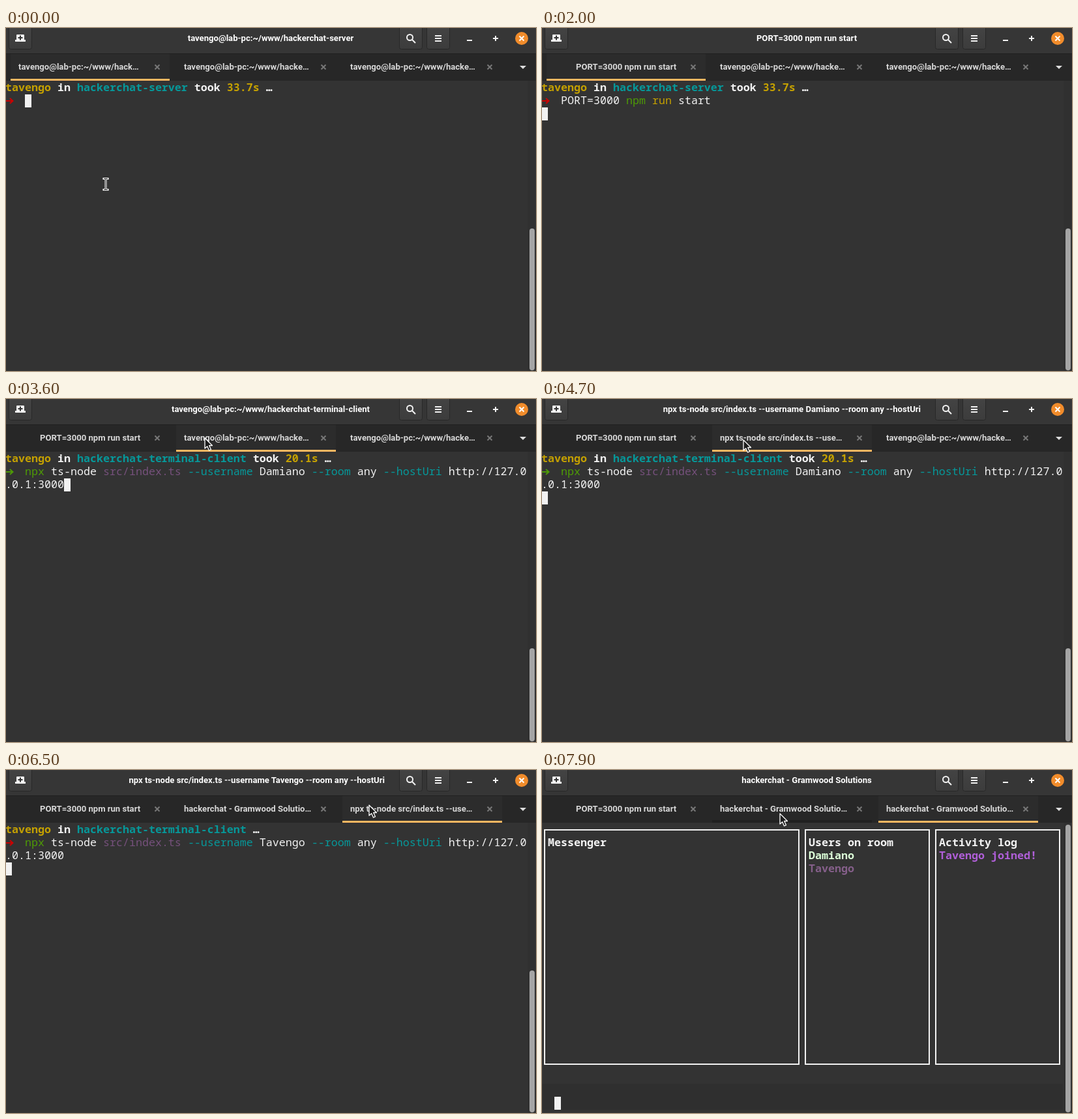
An HTML page for the animation above (8000 ms loop, 813 by 527 pixels).

```html
<!DOCTYPE html>
<html lang="en">
<head>
<meta charset="utf-8">
<title>Terminal chat</title>
<style>
html, body { margin: 0; width: 813px; height: 527px; overflow: hidden; background: #333; }
svg { display: block; }
text { white-space: pre; }
.mono { font: 400 16.667px "Noto Sans Mono", "DejaVu Sans Mono", monospace; }
.bold { font-weight: 700; }
.ui { font: 700 13.1px Roboto, "Open Sans", sans-serif; }
</style>
</head>
<body>
<svg width="813" height="527" viewBox="0 0 813 527">
  <defs>
    <linearGradient id="btn" x1="0" y1="0" x2="0" y2="1">
      <stop offset="0" stop-color="#444"/><stop offset="1" stop-color="#3c3c3c"/>
    </linearGradient>
  </defs>
  <rect width="813" height="527" fill="#333"/>
  <rect width="813" height="39" fill="#363636"/>
  <rect y="39" width="813" height="42" fill="#272727"/>
  <rect y="39" width="813" height="1" fill="#202020"/>
  <g fill="url(#btn)" stroke="#282828">
    <rect x="4.5" y="-4.5" width="35" height="37" rx="3"/>
    <rect x="603.5" y="-4.5" width="35" height="37" rx="3"/>
    <rect x="645.5" y="-4.5" width="35" height="37" rx="3"/>
  </g>
  <path d="M17 10H27Q28 10 28 11V18H30V21H14V18H16V11Q16 10 17 10Z" fill="#f2f2f2"/>
  <path d="M22 11.5V18.5M18.5 15H25.5" stroke="#333" stroke-width="2"/>
  <g fill="none" stroke="#f2f2f2" stroke-width="2">
    <circle cx="619.5" cy="14.5" r="4.5"/>
    <path d="M622.8 17.8L628 23M658 12H668M658 16H668M658 20H668M707 19H715M747 16H755M751 12V20"/>
  </g>
  <circle cx="791" cy="16" r="10" fill="#f18c2b"/>
  <path d="M787.5 12.5L794.5 19.5M794.5 12.5L787.5 19.5" stroke="#fff" stroke-width="2"/>
  <g id="scene"></g>
</svg>
<script>
const LOOP = 8000, STEP = 100;
const USER = "tavengo", SELF = "Tavengo", PEER = "Damiano";
const FG = "#f2f2f2", GOLD = "#c4a000", TEAL = "#06989a", RED = "#cc0000",
      GREEN = "#4e9a06", BLUE = "#3465a4", PLUM = "#75507b", GHOST = "#5a5a5a";
const HOME = USER + "@lab-pc:~/www/";
const START = "PORT=3000 npm run start";
const APP = "hackerchat - Gramwood Solutions";
const APP_TAB = "hackerchat - Gramwood Solutio…";
const TAB_X = [7, 261, 516];
const scene = document.getElementById("scene");

const rect = (x, y, w, h, fill, extra = "") =>
  `<rect x="${x}" y="${y}" width="${w}" height="${h}" fill="${fill}" ${extra}/>`;

const label = (x, y, s, fill, anchor = "start") =>
  `<text class="ui" x="${x}" y="${y}" fill="${fill}" text-anchor="${anchor}">${s}</text>`;

// Terminal cells are 10 by 20 pixels; parts are [text, colour].
function line(row, col, parts, bold) {
  const spans = parts.map(([s, c]) =>
    `<tspan fill="${c || FG}">${s.replace(/>/g, "&gt;")}</tspan>`).join("");
  return `<text class="mono${bold ? " bold" : ""}" x="${col * 10 - 1}" y="${97 + row * 20}">${spans}</text>`;
}

const block = (row, col) => rect(col * 10 - 1, 82 + row * 20, 10, 20, FG);

function prompt(dir, took, arrow) {
  const parts = [[USER, GOLD], [" in "], [dir, TEAL]];
  if (took) parts.push([" took "], [took, GOLD]);
  return line(0, 0, [...parts, [" …"]], true) +
    `<path d="M0 112H10M6 108L10.5 112L6 116" fill="none" stroke="${arrow}" stroke-width="2"/>`;
}

function typed(t) {
  return Math.min(3, Math.floor((t - 1200) / 100) + 1);
}

function serverScreen(t) {
  let s = "";
  if (t < 800) s += block(1, 3);
  else if (t >= 1200 && t < 1700) s += block(1, 3 + typed(t));
  else if (t >= 1700 && t < 2000) s += block(1, 26);
  else if (t >= 2000 && t < 2200) s += block(2, 0);
  else if (t >= 2200 && (t < 2600 || t >= 3200)) s += block(7, 0);
  s += prompt("hackerchat-server", "33.7s", RED);
  if (t >= 1700) {
    s += line(1, 3, [["PORT=3000 "], ["npm", GREEN], [" "], ["run", GOLD], [" start"]]);
  } else if (t >= 1200) {
    const n = typed(t);
    s += line(1, 3, [[START.slice(0, n), RED], [START.slice(n), GHOST]]);
  }
  if (t >= 2200) {
    s += line(3, 0, [["> hackerchat-server@1.0.0 start"]]) +
      line(4, 0, [["> node dist/"]]) +
      line(6, 0, [["[Socket Server]", BLUE], [" Running at port "], ["3000", GOLD]]);
  }
  return s;
}

function clientShell(name, took, arrow, cursor) {
  return cursor + prompt("hackerchat-terminal-client", took, arrow) +
    line(1, 3, [["npx", GREEN], [" ts-node "], ["src/index.ts", PLUM], [" "],
      ["--username", TEAL], [` ${name} `], ["--room", TEAL], [" any "],
      ["--hostUri", TEAL], [" http://127.0"]]) +
    line(2, 0, [[".0.1:3000"]]);
}

function chat(users, log) {
  const frame = (x, w) => rect(x, 92, w, 360, "none", `stroke="${FG}" stroke-width="2"`);
  return rect(0, 482, 799, 40, "#2f2f2f") +
    frame(4, 390) + frame(404, 190) + frame(604, 190) +
    line(1, 1, [["Messenger"]], true) +
    line(1, 41, [["Users on room"]], true) +
    line(1, 61, [["Activity log"]], true) +
    users.map((u, i) => line(2 + i, 41, [u], true)).join("") +
    log.map((u, i) => line(2 + i, 61, [u], true)).join("") +
    block(21, 2);
}

function clientScreen(t, c) {
  if (t < c.clear) {
    const cursor = t < c.enter ? (t < c.blink ? block(2, 9) : "") :
      t < c.enter + 600 ? block(3, 0) : "";
    return clientShell(c.name, c.took, c.arrow, cursor);
  }
  if (t < c.ready) return t < c.enter + 600 ? block(0, 0) : "";
  return t < c.ready + 100 ? chat([], []) : chat(c.users, c.log);
}

const clients = [
  { name: PEER, took: "20.1s", arrow: GREEN, enter: 4400, blink: 4200, clear: 5000, ready: 5400,
    users: [[PEER, "#525252"]], log: [[PEER + " joined!", "#b65c5c"]] },
  { name: SELF, took: "", arrow: RED, enter: 6500, blink: 6600, clear: 7000, ready: 7400,
    users: [[PEER, "#dcffd8"], [SELF, "#855f8a"]], log: [[SELF + " joined!", "#b05fd8"]] }
];

// Pointer path: time, x, y
const path = [
  [3000, 170, 226], [3200, 277, 111], [3400, 306, 64], [3600, 305, 60],
  [4600, 305, 60], [4700, 309, 63], [4800, 312, 63], [4900, 312, 63],
  [5600, 557, 54], [7300, 557, 54], [7900, 365, 67]
];

function pointerAt(t) {
  if (t < 1200) return [153, 240];
  if (t < 3000) return null;
  const i = path.findIndex(p => p[0] > t);
  if (i < 0) return path[path.length - 1].slice(1);
  const a = path[i - 1], b = path[i];
  let k = (t - a[0]) / (b[0] - a[0]);
  if (b[0] - a[0] > 400) k = k * k * (3 - 2 * k);
  return [a[1] + (b[1] - a[1]) * k, a[2] + (b[2] - a[2]) * k];
}

function pointer([x, y]) {
  const at = `transform="translate(${x.toFixed(1)} ${y.toFixed(1)})"`;
  if (y > 81) {
    const d = "M-3 -8.5H3M-3 8.5H3M0 -8.5V8.5";
    return `<g ${at} fill="none"><path d="${d}" stroke="#fff" stroke-width="3" stroke-linecap="square"/>` +
      `<path d="${d}" stroke="#222" stroke-width="1"/></g>`;
  }
  return `<path ${at} d="M0 0V16L3.7 12.7L6.5 19L9.5 17.7L6.7 11.5H11.5Z"
    fill="#1c1c1c" stroke="#fff" stroke-width="1.3" stroke-linejoin="round"/>`;
}

function tabLabels(t) {
  const command = "npx ts-node src/index.ts --use…";
  const client = c => t < c.enter ? HOME + "hacke…" : t < c.ready ? command : APP_TAB;
  return [t < 2000 ? HOME + "hack…" : START, ...clients.map(client)];
}

function title(t, active) {
  if (!active) return label(406, 20, t < 2000 ? HOME + "hackerchat-server" : START, "#fff", "middle");
  const c = clients[active - 1];
  if (t >= c.enter && t < c.ready) {
    return label(581, 20, `npx ts-node src/index.ts --username ${c.name} --room any --hostUri`, "#fff", "end");
  }
  return label(406, 20, t < c.enter ? HOME + "hackerchat-terminal-client" : APP, "#fff", "middle");
}

function tabs(t, active, mouse) {
  const names = tabLabels(t);
  return TAB_X.map((x, i) => {
    const w = i ? 245 : 244;
    const hover = mouse && mouse[1] > 40 && mouse[1] < 81 && mouse[0] >= x && mouse[0] < x + w;
    const back = i === active
      ? rect(x, 40, w, 38, "#2c2c2c") + rect(x, 78, w, 3, "#fbb761")
      : hover ? rect(x, 77, w, 4, "#202020") : "";
    const cx = x + (i ? 226 : 225);
    const tx = i ? x + 12 : t < 2000 ? 19 : 52;
    return back + label(tx, 64, names[i], "#d8d8d8") +
      `<path d="M${cx - 3.5} 56.5l7 7m0 -7l-7 7" stroke="#777" stroke-width="2"/>`;
  }).join("") + `<path d="M788 58H798L793 63Z" fill="#ddd"/>`;
}

function render(t) {
  const active = t < 3600 ? 0 : t < 6000 ? 1 : 2;
  const mouse = pointerAt(t);
  const c = clients[active - 1];
  const top = c && t >= c.ready ? 84 : active === 1 ? 383 : 308;
  scene.innerHTML = title(t, active) + tabs(t, active, mouse) +
    (c ? clientScreen(t, c) : serverScreen(t)) +
    rect(800, 81, 13, 446, "#303030") +
    rect(803, top, 8, 526 - top, "#a5a5a5", 'rx="4"') +
    (mouse ? pointer(mouse) : "");
}

let last = -1;
const begin = performance.now();
function tick() {
  const t = Math.floor(((performance.now() - begin) % LOOP) / STEP) * STEP;
  if (t !== last) render(last = t);
  requestAnimationFrame(tick);
}
tick();
</script>
</body>
</html>
```
